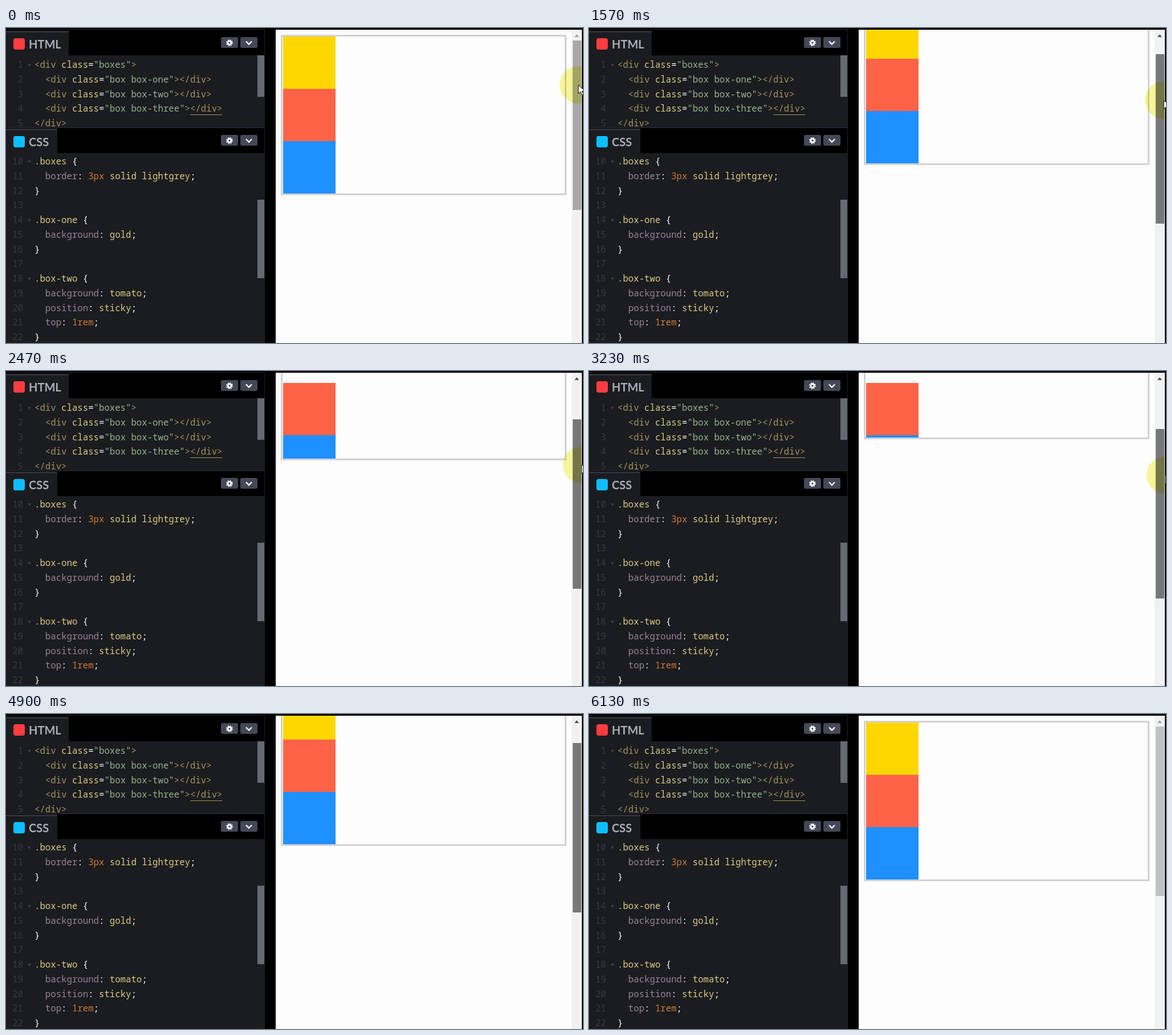
An HTML page for the animation above (6660 ms loop, 1012 by 554 pixels).

```html
<!DOCTYPE html>
<html lang="en">
<head>
<meta charset="utf-8">
<title>Sticky position demo</title>
<style>
  @property --scroll { syntax: "<length>"; inherits: true; initial-value: 0px; }
  html, body { margin: 0; width: 100%; height: 100%; overflow: hidden; background: #000; }
  .stage { position: relative; width: 1012px; height: 554px; overflow: hidden; background: #000; }
  .stage div, .stage pre, .stage svg { position: absolute; box-sizing: border-box; margin: 0; }

  /* Editor side */
  .editors { left: 0; top: 2px; width: 454px; height: 552px; border: solid #20202f; border-width: 1px 1px 0 0; }
  .tab { left: 0; height: 43px; background: #1a1c20; border-top: 3px solid #303238;
         font: bold 20px/40px Lato, sans-serif; color: #aaaeb6; padding-left: 40px; }
  .mark { left: 13px; top: 10px; width: 20px; height: 20px; border-radius: 4px; }
  .code { left: 0; width: 453px; background: #1a1c20; overflow: hidden; }
  pre { font: 15.7px/25.75px "Noto Sans Mono", monospace; color: #fff; }
  .lines { left: 50px; }
  .gutter { left: 0; width: 30px; text-align: right; color: #363941; }
  .bar { right: 0; width: 12px; background: #666872; }
  .fold { left: 38px; border: 3px solid transparent; border-top: 5px solid #3b3e46; }
  .tag { color: #a7925a; }
  .name { color: #ddca7e; }
  .str { color: #96b38a; }
  .prop { color: #9a8297; }
  .num { color: #d0782a; }
  .match { border-bottom: 1px solid #a7925a; }

  /* Preview side */
  .page { left: 473px; top: 3px; width: 537px; height: 551px; background: #fdfdfd; overflow: hidden;
          --scroll: 0px; animation: scroll 6660ms linear infinite; }
  .boxes { left: 9px; top: calc(9px - var(--scroll)); width: 501px; height: 282px; border: 3px solid #d1d1d3; }
  .box { left: 13px; width: 92px; height: 92px; }
  .one { top: calc(12.4px - var(--scroll)); background: #ffd700; }
  .two { top: max(104px - var(--scroll), 18px); background: #ff6347; }
  .three { top: calc(195.6px - var(--scroll)); background: #1e90ff; }
  .track { right: 0; top: 0; width: 18px; height: 551px; background: #f1f1f3; }
  .thumb { left: 2px; top: calc(19px + var(--scroll) * .46); width: 15px; height: 298px;
           animation: press 6660ms step-end infinite; }
  .arrow { left: 5px; top: 4px; border: 4.5px solid transparent; border-bottom: 5px solid;
           animation: arrow 6660ms step-end infinite; }

  /* Pointer, origin at the arrow tip */
  .pointer { width: 0; height: 0; animation: point 6660ms linear infinite; mix-blend-mode: multiply; }
  .pointer.front { mix-blend-mode: normal; }
  .halo { left: -33px; top: -33px; width: 66px; height: 66px; border-radius: 50%; background: #f7f79c; }

  @keyframes scroll {
    0%, 16.517% { --scroll: 0px; }
    23.574% { --scroll: 53px; }
    36.486% { --scroll: 136px; }
    37.087% { --scroll: 137px; }
    46.997% { --scroll: 159px; }
    48.048% { --scroll: 170px; }
    48.498% { --scroll: 174px; }
    53.003%, 57.508% { --scroll: 176px; }
    67.117% { --scroll: 122.5px; }
    77.027% { --scroll: 30px; }
    79.58% { --scroll: 12px; }
    83.634%, 100% { --scroll: 0px; }
  }
  @keyframes press {
    0% { background: #a8a8a8; }
    2.55% { background: #78787a; }
    91.592%, 100% { background: #c1c1c3; }
  }
  @keyframes arrow {
    0% { border-bottom-color: #a3a3a3; }
    16.6% { border-bottom-color: #505050; }
    83.5%, 100% { border-bottom-color: #a3a3a3; }
  }
  @keyframes point {
    0%, .45% { left: 1004px; top: 100px; }
    4.505%, 16.517% { left: 1007px; top: 102px; }
    23.574% { left: 1008px; top: 127px; }
    37.087% { left: 1010px; top: 165px; }
    46.997% { left: 1011px; top: 175px; }
    48.498% { left: 1011px; top: 183px; }
    53.003%, 57.508% { left: 1012px; top: 184px; }
    67.117%, 100% { left: 1052px; top: 158px; }
  }
</style>
</head>
<body>
<div class="stage">
  <div class="editors"></div>

  <div class="tab" style="top:5px;width:110px"><div class="mark" style="background:#ff3c41"></div>HTML</div>
  <div class="code" style="top:48px;height:127px">
    <pre class="gutter" style="top:4px">1
2
3
4
5</pre>
    <div class="fold" style="top:15px"></div>
    <pre class="lines" style="top:4px"><span class="tag">&lt;div</span> <span class="name">class</span>=<span class="str">"boxes"</span><span class="tag">&gt;</span>
  <span class="tag">&lt;div</span> <span class="name">class</span>=<span class="str">"box box-one"</span><span class="tag">&gt;&lt;/div&gt;</span>
  <span class="tag">&lt;div</span> <span class="name">class</span>=<span class="str">"box box-two"</span><span class="tag">&gt;&lt;/div&gt;</span>
  <span class="tag">&lt;div</span> <span class="name">class</span>=<span class="str">"box box-three"</span><span class="tag">&gt;<span class="match">&lt;/div&gt;</span></span>
<span class="tag">&lt;/div&gt;</span></pre>
    <div class="bar" style="top:0;height:73px"></div>
  </div>
  <div style="left:0;top:175px;width:454px;height:1px;background:#2a2a40"></div>

  <div class="tab" style="top:177px;width:90px"><div class="mark" style="background:#0ebeff"></div>CSS</div>
  <div class="code" style="top:220px;height:334px">
    <pre class="gutter" style="top:2px">10
11
12
13
14
15
16
17
18
19
20
21
22</pre>
    <div class="fold" style="top:13px"></div>
    <div class="fold" style="top:116px"></div>
    <div class="fold" style="top:219px"></div>
    <pre class="lines" style="top:2px"><span class="name">.boxes</span> {
  <span class="prop">border</span>: <span class="num">3px</span> <span class="name">solid lightgrey</span>;
}

<span class="name">.box-one</span> {
  <span class="prop">background</span>: <span class="name">gold</span>;
}

<span class="name">.box-two</span> {
  <span class="prop">background</span>: <span class="name">tomato</span>;
  <span class="prop">position</span>: <span class="name">sticky</span>;
  <span class="prop">top</span>: <span class="num">1rem</span>;
}</pre>
    <div class="bar" style="top:82px;height:138px"></div>
  </div>

  <svg width="454" height="220" style="left:0;top:0">
    <defs>
      <g id="buttons" fill="none" stroke="#fff">
        <path d="M380 16h24a3 3 0 0 1 3 3v13a3 3 0 0 1-3 3h-24a3 3 0 0 1-3-3v-13a3 3 0 0 1 3-3zM414 16h24a3 3 0 0 1 3 3v13a3 3 0 0 1-3 3h-24a3 3 0 0 1-3-3v-13a3 3 0 0 1 3-3z" fill="#444857" stroke="none"/>
        <circle cx="392" cy="26" r="3.1" stroke-width="2.8"/>
        <circle cx="392" cy="26" r="5" stroke-width="1.8" stroke-dasharray="2 1.927"/>
        <path d="M421 23.5l5 5 5-5" stroke-width="2.4"/>
      </g>
    </defs>
    <use href="#buttons"/>
    <use href="#buttons" y="172"/>
  </svg>

  <div class="page">
    <div class="boxes"></div>
    <div class="box one"></div>
    <div class="box three"></div>
    <div class="box two"></div>
    <div class="track">
      <div class="arrow"></div>
      <div class="thumb"></div>
    </div>
  </div>

  <div class="pointer"><div class="halo"></div></div>
  <div class="pointer front">
    <svg width="14" height="20" style="left:-1px;top:-1px">
      <path d="M1 1v15.5l3.6-3.4 2.5 5.6 2.6-1.1-2.4-5.5h4.9z" fill="#fff" stroke="#000"/>
    </svg>
  </div>
</div>
</body>
</html>
```
